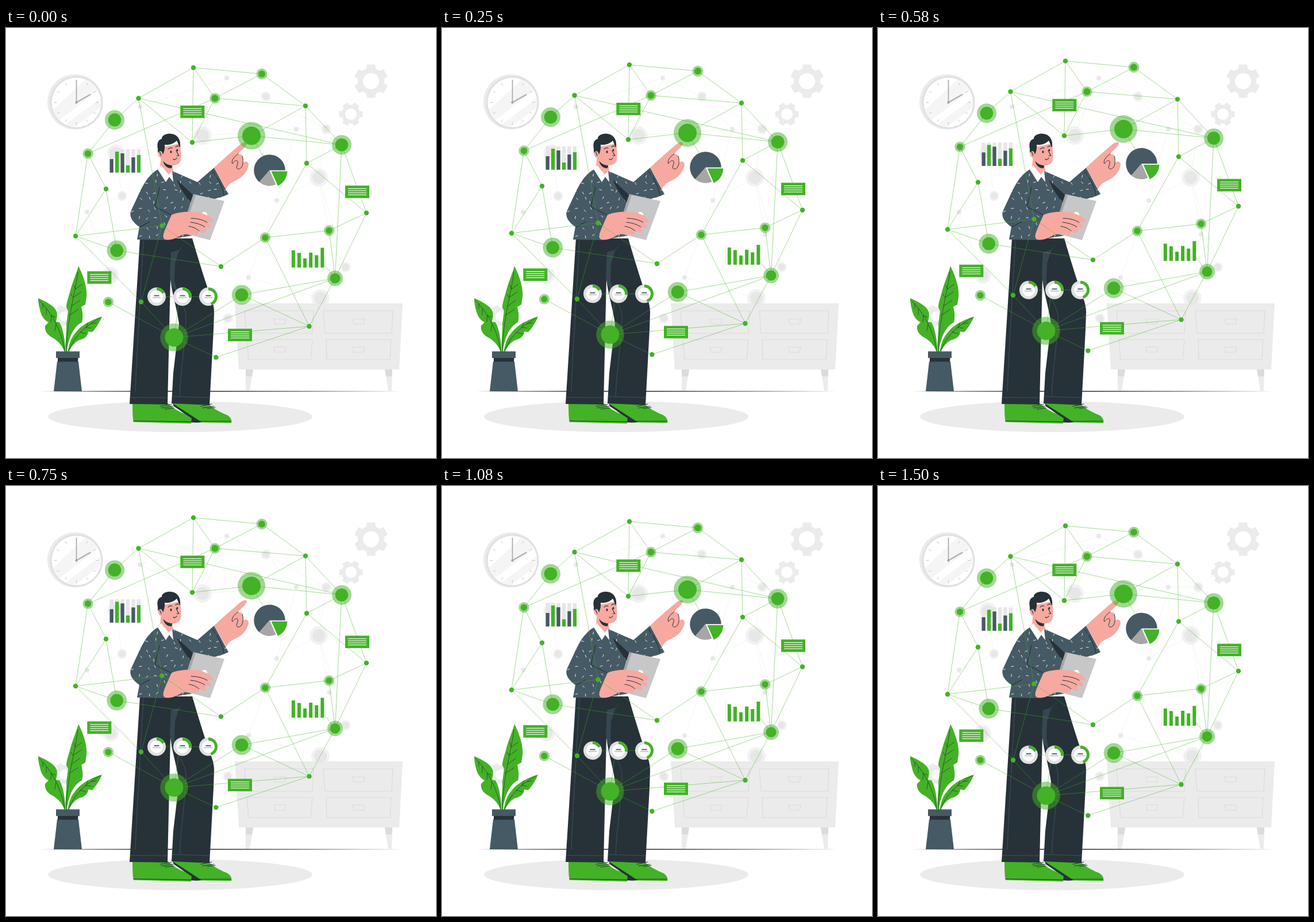
An HTML page for the animation above (1540 ms loop, 748 by 748 pixels).

```html
<!DOCTYPE html>
<html lang="en">
<head>
<meta charset="utf-8">
<title>Data network</title>
<style>
html, body { margin: 0; width: 100%; height: 100%; overflow: hidden; background: #fff; }
svg { display: block; width: 100vw; height: 100vh; }
.ln { fill: none; stroke-linecap: round; stroke-linejoin: round; }
</style>
</head>
<body>
<svg viewBox="0 0 748 748" xmlns="http://www.w3.org/2000/svg">
<defs>
  <clipPath id="face"><circle cx="122.500" cy="129.500" r="42.500"/></clipPath>
  <path id="shirt" d="M264 246C246 257 238 274 230 291L217 319C214 329 221 338 232 346L228 368L277 369L324 361L316 325L321 303C345 301 370 298 387 289L362 243L333 268L290 249L284 258Z"/>
  <clipPath id="cloth"><use href="#shirt"/></clipPath>
</defs>

<g id="room">
  <ellipse cx="303" cy="676" rx="230" ry="27" fill="#ebebeb"/>
  <path d="M58 632Q375 630.500 692 632Q375 633.500 58 632" fill="#263238"/>
  <g id="gears" fill="#ebebeb" fill-rule="evenodd"></g>
  <g id="clock">
    <circle cx="120" cy="128.500" r="48" fill="#ebebeb"/>
    <circle cx="122.500" cy="129.500" r="46" fill="#e0e0e0"/>
    <circle cx="122.500" cy="129.500" r="43" fill="#fff"/>
    <g clip-path="url(#face)" fill="#f5f5f5">
      <path d="M74 150L144 84L166 104L88 164ZM98 172L170 118V134L112 178Z"/>
    </g>
    <g id="ticks" stroke="#c7c7c7" stroke-width="1"></g>
    <path d="M122.500 129.500V90" stroke="#a6a6a6" stroke-width="1.600"/>
    <path d="M122.500 129.500L147 115.500" stroke="#b0b0b0" stroke-width="2.200"/>
    <circle cx="122.500" cy="129.500" r="2.200" fill="#a6a6a6"/>
  </g>
  <g id="dresser">
    <path d="M417 594H430L424 631H417ZM659 594H672L671 631H665Z" fill="#ebebeb"/>
    <path d="M417 594H430L428 606H417ZM659 594H672L671.500 606H661Z" fill="#dbdbdb"/>
    <path d="M398 479H690L684 594H405Z" fill="#ebebeb"/>
    <path d="M415 492H535L533 531H418ZM552 492H673L671 531H555ZM419 542H533L530 577H422ZM557 542H670L668 577H558Z
      M466 506H487L485 515H468ZM603 506H624L622 515H605ZM466 555H487L485 564H468ZM603 555H624L622 564H605Z" fill="none" stroke="#dbdbdb" stroke-width="1.200"/>
  </g>
</g>

<g id="ghost"></g>

<g id="plant">
  <g fill="#43b226">
    <path d="M102 564C98 551 88 542 78 537C70 532 67 525 68 518L74 512C66 508 61 500 59 490C57 483 56 476 56 470C69 476 83 482 88 493C90 499 88 506 87 511L93 512C100 524 103 545 103.500 564Z"/>
    <path d="M104 564C102 545 106 530 105 515L108 492L105 486C105 477 109 468 112 456C116 441 123 426 126 414C133 428 142 450 140 468L138 481L131 485C134 496 134 505 132 512C119 518 108 538 106 564Z"/>
    <path d="M107 564C110 549 113 539 121 530C130 518 145 509 167 502C163 512 157 522 150 529L143 528C143 535 137 541 127 543C119 547 112 556 109 564Z"/>
  </g>
  <g class="ln" stroke="#263238" stroke-width=".7">
    <path d="M58 474C80 495 98 530 102 562M70 488V499M79 500L78 511M87 515L85 527M79 500L86 503M64 480V488"/>
    <path d="M125 424C122 455 106 505 105 562M121 454L132 446M118 468L131 459M114 484L128 474M110 500L125 490M121 454L118 447M117 469L113 463"/>
    <path d="M164 504C140 517 119 535 109 562M148 514L157 513M138 521L148 522M129 529L139 532M140 520L142 513"/>
  </g>
  <path d="M87 562.500H128V574H87Z" fill="#455a64"/>
  <path d="M89 580H126L132 632H83Z" fill="#455a64"/>
  <path d="M90 574H125.500L125 580.500H90Z" fill="#263238"/>
</g>

<g id="man">
  <g fill="#43b226">
    <path d="M220 653H282C294 665 308 670 320 676Q324 680 322 688L222 685.500Q220 680 220 653Z"/>
    <path d="M290 653H352C362 664 375 669 386 674Q394 680 392 687L326 686Z"/>
  </g>
  <path d="M290 653L340 685.500Q334 687 322 686L323 679L292 658Z" fill="#263238"/>
  <path class="ln" d="M222 683.500L322 685M334 684H391M268 658L288 655M270 661L291 658M276 663L292 661M339 658L358 654M342 661L362 658M350 662L364 660" stroke="#263238" stroke-width="1"/>
  <path d="M233 366H324C334 400 346 440 357 470Q362 482 362 495L361 525L354 656L288 653L291 600L301 515C297 485 288 460 286 436L281 655L215 654Z" fill="#263238"/>
  <path d="M287 390L301 386L309 376L300 390L294 410L293 440L299 462L288 448L285 430Z" fill="#37474f"/>
  <g class="ln" stroke="#455a64" stroke-width=".8">
    <path d="M239 370C235 450 228 550 225 632M217 642.500L281 643M289 641L354 643M299 462C304 480 315 488 313 510C311 550 304 600 302 640"/>
  </g>

  <path d="M270 218L268 241L282 260L291 248L289 234Z" fill="#f7a9a0"/>
  <use href="#shirt" fill="#455a64"/>
  <g id="dashes" clip-path="url(#cloth)" stroke="#fff" stroke-width=".9" stroke-linecap="round"></g>
  <path d="M297 264L326 291L322 304Q307 288 297 264Z" fill="#263238"/>
  <path class="ln" d="M267 277L259 311L287 325M233 346L250 337M359 249C369 262 377 276 379 291" stroke="#263238" stroke-width="1.100"/>
  <path d="M264 246L270 239L283 255L289 248L291 268L284 259L278 268Z" fill="#fff"/>

  <path d="M362 243C376 229 392 216 407 203C413 198 419 197 419 201C418 207 406 215 403 220C409 217 414 222 412 235C416 230 422 232 422 238C420 252 409 262 396 267Q386 272 383 280Z" fill="#f7a9a0"/>
  <path class="ln" d="M404 219C396 224 391 232 394 236C400 227 406 230 402 239C399 246 406 247 409 243C413 238 413 229 411 223" stroke="#263238" stroke-width="1"/>

  <path d="M273 207L302 201C305 212 305 222 304 230C302 238 292 240 287 239C279 239 273 232 272 225Z" fill="#f7a9a0"/>
  <path d="M273 231C278 237 284 239 289 239L288 244C281 244 276 241 273 231Z" fill="#263238"/>
  <ellipse cx="269.500" cy="218.500" rx="5.200" ry="8" fill="#f7a9a0" transform="rotate(-12 269.500 218.500)"/>
  <path d="M264 210C262 200 265 194 271 193C270 187 280 183 286 184C296 184 305 192 303 208C300 205 300 201 297 196C291 202 283 204 276 203Q277 211 273 220C271 212 267 213 264 217Z" fill="#263238"/>
  <g class="ln" stroke="#263238" stroke-width="1.100">
    <path d="M282 211Q285 207 289 209M295 207Q298 204 300 206M296 213Q299 220 301 222L297 222M291 228Q294 231 297 226M267 215L270 222"/>
    <ellipse cx="287" cy="215.500" rx="1" ry="1.700" fill="#263238"/><ellipse cx="298" cy="212.500" rx=".9" ry="1.500" fill="#263238"/>
  </g>

  <path d="M326 289L380 301L355 369L304 356Z" fill="#c7c7c7"/>
  <path d="M326 289L330 290L308 357L304 356Z" fill="#a6a6a6"/>
  <circle cx="345" cy="325" r="5" fill="#fff"/>
  <path d="M288 325C304 318 326 319 340 322C351 325 361 333 360 337C358 340 351 337 347 336C354 340 359 345 356 348C353 350 347 345 343 344C349 349 350 354 346 356C342 357 337 353 332 351C337 356 336 359 333 360C325 359 314 357 306 360C297 365 287 370 277 368C270 364 274 356 288 325Z" fill="#f7a9a0"/>
  <path class="ln" d="M322 331Q338 331 350 338M321 338Q335 339 346 346M318 345Q328 346 336 353" stroke="#263238" stroke-width="1"/>
</g>

<g id="net"></g>
</svg>
<script>
const $ = id => document.getElementById(id);
const GREEN = '#43b226', SLATE = '#455a64';

function add(parent, tag, attrs) {
  const el = document.createElementNS('http://www.w3.org/2000/svg', tag);
  for (const k in attrs) el.setAttribute(k, attrs[k]);
  return parent.appendChild(el);
}
const dot = (g, cx, cy, r, fill, opacity = 1) => add(g, 'circle', { cx, cy, r, fill, opacity });
const box = (g, x, y, width, height, fill) => add(g, 'rect', { x, y, width, height, fill });
const line = (g, x1, y1, x2, y2, attrs) => add(g, 'line', { x1, y1, x2, y2, ...attrs });
const polar = (x, y, r, deg) => {
  const a = deg * Math.PI / 180;
  return [x + r * Math.cos(a), y + r * Math.sin(a)];
};
const arc = (x, y, r, a, b) =>
  `${polar(x, y, r, a)}A${r} ${r} 0 ${b - a > 180 ? 1 : 0} 1 ${polar(x, y, r, b)}`;

function gear(x, y, r, hole, teeth, turn) {
  const pts = [];
  for (let i = 0; i < teeth; i++)
    for (const [d, k] of [[-20, .78], [-14, 1], [14, 1], [20, .78]])
      pts.push(polar(x, y, r * k, turn + i * 360 / teeth + d).map(v => v.toFixed(2)).join(' '));
  add($('gears'), 'path', {
    d: `M${pts.join('L')}ZM${x - hole} ${y}a${hole} ${hole} 0 1 0 ${2 * hole} 0a${hole} ${hole} 0 1 0 ${-2 * hole} 0`
  });
}
gear(635, 92.5, 30, 14, 6, 30);
gear(600, 150, 21, 10, 6, 0);
gear(102, 502, 21, 9, 6, 0);

for (let a = 0; a < 360; a += 30)
  line($('ticks'), ...polar(122.5, 129.5, 34, a), ...polar(122.5, 129.5, 39, a));

// Shirt pattern
let seed = 7;
const rnd = () => (seed = seed * 16807 % 2147483647) / 2147483647;
for (let y = 250; y < 370; y += 15)
  for (let x = 212; x < 390; x += 15) {
    const a = rnd() * 180, px = x + rnd() * 9, py = y + rnd() * 9;
    line($('dashes'), ...polar(px, py, 2, a), ...polar(px, py, -2, a));
  }

// Still, pale nodes behind
const pale = [
  [384, 87, 4], [452, 119, 6], [233, 137, 4], [342, 187, 11], [505, 176, 4], [557, 176, 6],
  [544, 260, 11], [471, 300, 4], [202, 292, 6], [141, 320, 4], [191, 217, 10], [182, 430, 10],
  [422, 434, 4], [386, 505, 6], [591, 416, 6], [547, 470, 11], [562, 359, 4]
];
const paleLinks = '0-1 0-2 0-3 1-4 1-5 2-3 3-4 4-5 4-7 5-6 6-7 6-16 7-12 8-9 8-10 9-11 12-13 12-15 14-15 14-16 14-6 3-10';
const ghost = $('ghost');
for (const s of paleLinks.split(' ')) {
  const [a, b] = s.split('-').map(i => pale[i]);
  line(ghost, a[0], a[1], b[0], b[1], { stroke: '#f1f1f1', 'stroke-width': .8 });
}
for (const [x, y, r] of pale) {
  if (r > 4) dot(ghost, x, y, r * 1.45, '#ebebeb', .65);
  dot(ghost, x, y, r, '#e3e3e3', .8);
}

// Floating network: x, y, radius, halo radius
const nodes = {
  A: [326, 69, 4.2], B: [445, 80, 6, 9.5], C: [230.5, 122.3, 4.2], D: [363.5, 122.3, 6, 9.2],
  E: [521, 135.5, 4.2], F: [189, 160, 11.3, 17], G: [142.5, 218.5, 5.7, 9.2], H: [324, 199, 4.2],
  I: [427, 187.5, 16, 24], J: [584, 203.3, 11.3, 17], K: [523, 235.4, 4.2], L: [174, 280, 4.2],
  M: [121, 362, 4.2], N: [192.7, 387, 11.3, 17.3], O: [271.5, 344, 4.2], P: [374, 415, 4.2],
  Q: [451, 364.7, 5.7, 9.2], R: [562, 352.4, 5.7, 9.2], S: [627, 321.7, 4.2], T: [572.5, 435.5, 9, 13.5],
  U: [410, 464.3, 11.3, 17.3], V: [527.5, 519, 4.2], W: [365.3, 573, 4.2], X: [292.5, 538.4, 16, 24.3],
  Y: [235, 476.5, 4.2], Z: [178, 476.7, 5.7, 9.2]
};
const links = 'AB AC AH AD BD BE DE CF CH CJ CO GF GD HI HD IE IJ EJ EK KJ KS KQ JS JT GL LM GM LN MO MN MY ' +
  'NP OP OY QR QV QP RS RT ST TU TV TX UV UX XV XW XY XZ WV';
const net = $('net');
const wire = (x1, y1, x2, y2) => line(net, x1, y1, x2, y2, { stroke: GREEN, 'stroke-width': .6, opacity: .8 });
for (const [a, b] of links.split(' ')) wire(...nodes[a].slice(0, 2), ...nodes[b].slice(0, 2));
wire(427, 187.5, 448, 224);
wire(262, 467.5, 352, 467.5);
wire(302, 467.5, 292.5, 538.4);
wire(548, 405, 572.5, 435.5);
for (const [x, y, r, halo] of Object.values(nodes)) {
  if (halo) dot(net, x, y, halo, GREEN, .5);
  dot(net, x, y, r, GREEN);
}

// Cards
for (const [x, y] of [[303.3, 135], [590, 274.2], [141.3, 423.3], [386, 523.2]]) {
  box(net, x, y, 42, 21.7, GREEN);
  for (let i = 0; i < 4; i++) box(net, x + 5, y + 4.8 + i * 3.6, 32, 1.1, '#fff');
}

// Bar charts
[23.5, 36.5, 33.5, 12.5, 26.5, 30.5].forEach((h, i) => {
  const x = 180.5 + i * 9.45;
  box(net, x, 211, 6.3, 40.6, '#e6e6e6');
  box(net, x, 251.6 - h, 6.3, h, i % 2 ? GREEN : SLATE);
});
line(net, 493.5, 382, 493.5, 417, { stroke: '#c7c7c7', 'stroke-width': .7, 'stroke-dasharray': '2 2' });
[30, 25.5, 16, 26, 21.5, 34.5].forEach((h, i) => box(net, 496.8 + i * 10.1, 416.8 - h, 6, h, GREEN));

// Pie
const slice = (x, y, r, a, b, fill) =>
  add(net, 'path', { d: `M${x} ${y}L${arc(x, y, r, a, b)}Z`, fill });
slice(458.5, 247.6, 27.2, 131, 360, SLATE);
slice(458.5, 247.6, 27.2, 66, 131, '#a6a6a6');
slice(461.5, 249.3, 27.7, 0, 66, GREEN);

// Gauges
[[262, 62], [307, 98], [352, 160]].forEach(([x, turn]) => {
  const y = 467.4;
  dot(net, x, y, 16, '#e0e0e0');
  add(net, 'path', { d: `M${arc(x, y, 13.4, -90, turn - 90)}`, fill: 'none', stroke: GREEN, 'stroke-width': 5.2 });
  dot(net, x, y, 10.9, '#fff');
  box(net, x - 4.5, y - 2.6, 9, 1.8, SLATE);
  box(net, x - 7, y + 1.2, 14, 1, '#8f9aa0');
});

// Linear up-and-down float, stepped at 24 pictures a second
const LOOP = 1540, STEPS = 37, LIFT = 15;
function draw(ms) {
  const t = Math.floor((ms % LOOP + 5) / (LOOP / STEPS)) % STEPS * 41.67;
  const phase = (t + 35) / 1515 % 1;
  const y = .6 - LIFT * (1 - Math.abs(1 - 2 * phase));
  net.setAttribute('transform', `translate(0 ${y.toFixed(2)})`);
}
const start = performance.now();
function tick() {
  draw(performance.now() - start);
  requestAnimationFrame(tick);
}
tick();
</script>
</body>
</html>
```
